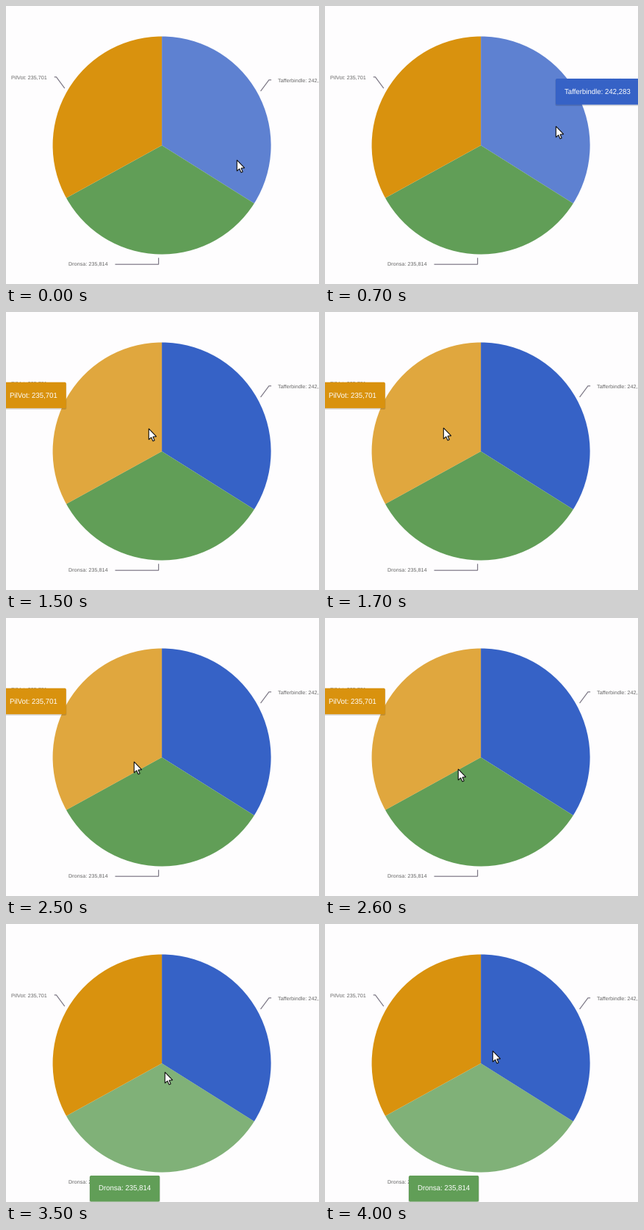
Recreate the animation shown at these times as a matplotlib script. Size 426x379 px, loop 4.1 s.

```python
import matplotlib.pyplot as plt
import numpy as np
from matplotlib.animation import FuncAnimation
from matplotlib.patches import FancyBboxPatch, Polygon, Wedge

W, H, DPI = 426, 379, 100
FRAMES, STEP = 41, 100
CENTER, RADIUS = np.array([212.1, 190]), 148.5
TIP_HEIGHT, TIP_PAD = 35.5, 12

plt.rcParams["font.family"] = "Liberation Sans"
plt.rcParams["text.hinting"] = "none"

# name, value, colour, label position, tooltip corner
SLICES = [
    ("Tafferbindle", 242283, "#3662c6", (370.5, 103), (314, 99)),
    ("Dronsa", 235814, "#619e57", (85, 354.4), (114, 343)),
    ("PilVot", 235701, "#d9920e", (7, 99), (-7, 95.7)),
]

# first frame -> hovered slice
HOVERS = {0: 0, 15: 2, 27: 1}

# pointer stops by frame
STOPS = {0: (314, 210), 7: (314, 164), 14: (210, 159), 17: (161, 158),
         25: (174, 196), 29: (201, 236), 40: (228, 173)}

fig = plt.figure(figsize=(W / DPI, H / DPI), dpi=DPI, facecolor="#fefdfe")
ax = fig.add_axes([0, 0, 1, 1])
ax.set_xlim(0, W)
ax.set_ylim(H, 0)
ax.axis("off")


def px(size):
    return size * 72 / DPI


def write(x, y, text, size, color, z):
    """Draw text and return it with its width in pixels."""
    label = ax.text(x, y, text, fontsize=px(size), color=color, zorder=z)
    return label, label.get_window_extent().width


def box(x, y, w, h, color, alpha, z):
    return ax.add_patch(FancyBboxPatch(
        (x, y), w, h, boxstyle="round,pad=0,rounding_size=2",
        facecolor=color, edgecolor="none", alpha=alpha, zorder=z))


def make_tooltip(text, color, corner):
    x, y = corner
    label, width = write(x + TIP_PAD, y + TIP_HEIGHT / 2 + 3.4, text,
                         9.6, "white", 6)
    width += 2 * TIP_PAD
    return [label,
            box(x - 0.5, y + 0.5, width + 1, TIP_HEIGHT + 1.2, "black", 0.15, 4),
            box(x, y, width, TIP_HEIGHT, color, 1, 5)]


def draw_label(text, pos, mid):
    """Outer label, joined to the rim by a line bent at the label's height."""
    x, base = pos
    _, width = write(x, base, text, 7.3, "#666666", 2)
    out = np.array([np.cos(mid), np.sin(mid)])
    rim = CENTER + (RADIUS + 5.5) * out
    knee = rim[0] + 11 * np.round(out[0])
    edge = x - 10 if x > rim[0] else x + width + 10.5
    y = base - 2.2
    ax.plot([rim[0], knee, edge], [rim[1], y, y], color="#7b7684",
            lw=px(1.2), zorder=2, snap=False, solid_joinstyle="miter")


wedges, tooltips = [], []
total = sum(s[1] for s in SLICES)
angle = -90
for name, value, color, label_pos, corner in SLICES:
    end = angle + 360 * value / total
    wedges.append(ax.add_patch(Wedge(CENTER, RADIUS, angle, end,
                                     facecolor=color, edgecolor="none")))
    text = f"{name}: {value:,}"
    draw_label(text, label_pos, np.radians((angle + end) / 2))
    tooltips.append(make_tooltip(text, color, corner))
    angle = end

arrow = np.array([(0, 0), (0, 15), (3.4, 11.9), (5.7, 17), (7.9, 16),
                  (5.7, 11.1), (10.4, 10.8)])
pointer = ax.add_patch(Polygon(arrow, closed=True, facecolor="white",
                               edgecolor="#111111", lw=px(1.1), zorder=9))


def pointer_at(frame):
    return [np.interp(frame, list(STOPS), axis) for axis in zip(*STOPS.values())]


def update(frame):
    hovered = HOVERS[max(start for start in HOVERS if start <= frame)]
    for i, (wedge, parts) in enumerate(zip(wedges, tooltips)):
        wedge.set_alpha(0.8 if i == hovered else 1)
        for part in parts:
            part.set_visible(i == hovered and frame > 0)
    pointer.set_xy(arrow + np.round(pointer_at(frame)) + (0.3, 0))
    return wedges + [pointer]


anim = FuncAnimation(fig, update, frames=FRAMES, interval=STEP,
                     repeat=True, repeat_delay=0, blit=False)
plt.show()
```
